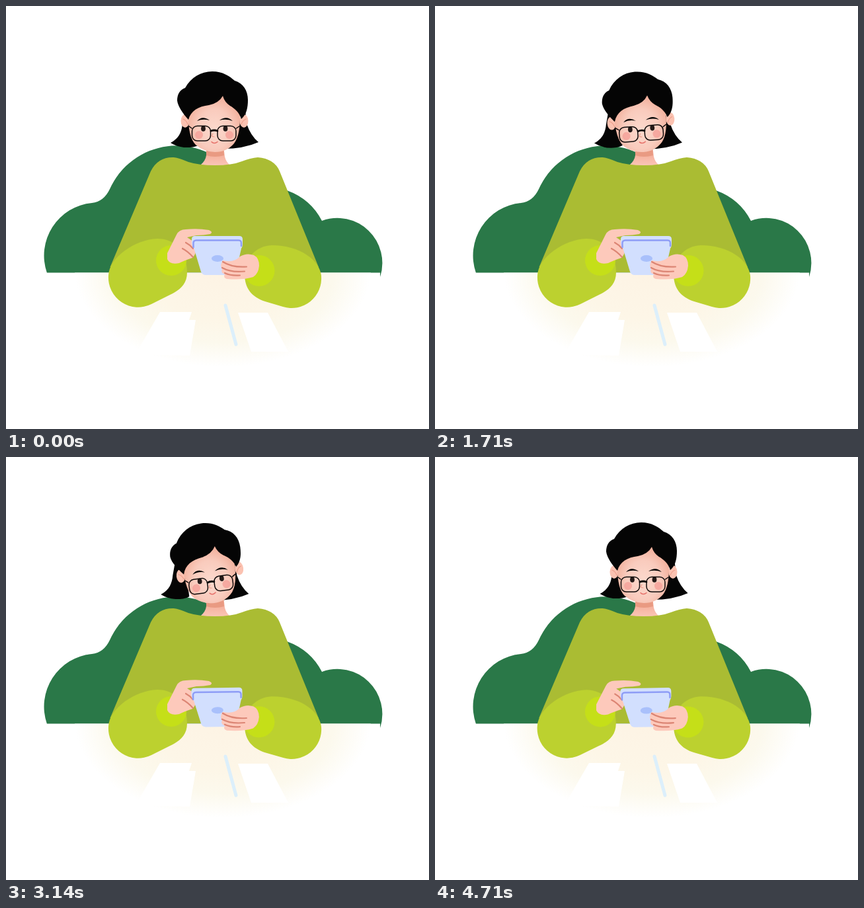
An HTML page for the animation above (4780 ms loop, 640x640 px).

```html
<!DOCTYPE html>
<html lang="en">
<head>
<meta charset="utf-8">
<title>Woman with phone</title>
<style>
html, body { margin: 0; width: 100%; height: 100%; overflow: hidden; background: #fff; }
svg { display: block; width: 100vw; height: 100vh; }
.line { fill: none; stroke-linecap: round; stroke-linejoin: round; }
.crease { stroke: #dc8574; stroke-width: 2.2; }
.ink { stroke: #0a0808; stroke-width: 1.5; }
.skin { fill: #fdc9bb; }
.olive { fill: #aabc33; }
.sleeve { fill: #bcd12f; }
.cuff { fill: #c5df18; }
.hair { fill: #050505; }
</style>
</head>
<body>
<svg viewBox="0 0 640 640">
  <defs>
    <radialGradient id="glow">
      <stop offset="0" stop-color="#fdf3e4"/>
      <stop offset=".5" stop-color="#fdf6e7"/>
      <stop offset=".75" stop-color="#fcf9ed"/>
      <stop offset="1" stop-color="#fff"/>
    </radialGradient>
    <radialGradient id="face" cx=".5" cy=".62" r=".6">
      <stop offset="0" stop-color="#fcd9cd"/>
      <stop offset=".55" stop-color="#f9cbbd"/>
      <stop offset="1" stop-color="#f0aa95"/>
    </radialGradient>
    <linearGradient id="neck" x2="0" y2="1">
      <stop offset=".3" stop-color="#f3ab96"/>
      <stop offset="1" stop-color="#fbc6b7"/>
    </linearGradient>
    <clipPath id="desk"><path d="M0 403.500H640V640H0Z"/></clipPath>
  </defs>

  <path fill="#2a7848" d="M62 404A80 80 0 0 1 130 298Q148 296 157 277A111 111 0 0 1 345 253L425 279Q461 292 478 325A68 68 0 0 1 566 410L565 404Z"/>

  <g clip-path="url(#desk)">
    <path fill="#fff" d="M60 403H566V560H60Z"/>
    <ellipse cx="328" cy="400" rx="224" ry="146" fill="url(#glow)"/>
  </g>
  <path fill="#fff" d="M233 463H281L277 475H287L278 529L196 527ZM351 464H396L427 523H371Z"/>
  <path class="line" stroke="#dceffb" stroke-width="5" d="M332 453L348 512"/>

  <g id="tails" class="hair">
    <path d="M272 150L267 178C266 190 262 200 249 207Q262 215 278 214Q288 213 292 210L284 150Z"/>
    <path d="M362 158L364 178Q370 196 382 206Q360 216 328 216L348 180Z"/>
  </g>
  <path fill="url(#neck)" d="M303 212H329L331 228Q333 236 339 241Q316 243 294 241Q302 234 303 226Z"/>
  <path fill="#e99a82" d="M303 216H329L330 226Q316 230 303 226Z"/>
  <path id="torso" class="olive"/>

  <g id="head">
    <ellipse cx="271" cy="174" rx="6.5" ry="10" fill="#fbc2b1"/>
    <ellipse cx="360" cy="174" rx="6.5" ry="10" fill="#fbc2b1"/>
    <path class="line" stroke="#ee9f8c" stroke-width="1.2" d="M268 171Q273 173 275 179M363 171Q358 173 356 179"/>
    <path fill="url(#face)" d="M276 162Q275 198 287 210Q300 221 316 221Q334 221 345 208Q355 195 354 162L342 130H290Z"/>
    <path class="hair" d="M276 172C268 163 260 152 259 143C259 133 264 126 271 124C280 108 295 99 312 99C328 99 338 106 346 113C359 117 366 128 366 142C366 154 364 164 356 171C353 161 346 155 339 151Q331 146 328 136Q322 147 307 150C291 152 280 158 276 172Z"/>
    <g fill="#f59d96" opacity=".75">
      <circle cx="292" cy="195" r="6"/><circle cx="338" cy="195" r="6"/>
    </g>
    <g fill="#241a18">
      <ellipse cx="298.5" cy="185.5" rx="3.4" ry="4.3"/><ellipse cx="332" cy="185.5" rx="3.4" ry="4.3"/>
    </g>
    <path id="brows" class="hair" d="M289 174Q297 165 308 173Q298 170 289 174ZM343 174Q334 165 323 173Q333 170 343 174Z"/>
    <g class="line ink">
      <rect x="281.5" y="181.500" width="28" height="22.500" rx="8"/>
      <rect x="320" y="181.500" width="28" height="22.500" rx="8"/>
      <path d="M281 185L277 182M348.500 185L353 182"/>
      <path stroke-width="2.8" d="M310 189Q315 187 320 189"/>
    </g>
    <path class="line" stroke="#f09d8c" stroke-width="1.2" d="M313 193L311 197L315 198"/>
    <path class="line" stroke="#e66f68" stroke-width="1.5" d="M311 205.500Q315 209.500 320 205.500"/>
  </g>

  <g id="leftArm">
    <path class="sleeve" d="M155 408C156 380 196 353 229 352C256 352 274 373 274 403C274 421 263 430 248 437L220 451A45 45 0 0 1 155 408Z"/>
    <circle class="cuff" cx="250" cy="385" r="23"/>
    <path class="skin" d="M244 374L258 346Q262 338 272 338Q290 336 307 339Q314 342 309 345Q299 347 288 347L274 350L286 358Q291 372 282 381Q270 385 262 389Q248 392 244 383Z"/>
    <path class="line crease" d="M272 358Q278 361 283 367M267 367Q275 371 283 380"/>
  </g>

  <g id="rightSleeve">
    <path class="sleeve" d="M477 408C475 385 445 362 402 362C378 363 361 382 361 405C361 428 372 440 392 447L419 455A45 45 0 0 0 477 408Z"/>
    <circle class="cuff" cx="383" cy="400.500" r="23.500"/>
  </g>
  <g id="phone">
    <path fill="#d2dffe" d="M281 353Q281 348 286 348H353Q358 348 358 353V361Q358 364 356 367L348 402Q346 407 341 407H302Q297 407 295 402L284.500 367Q281 363 281 359Z"/>
    <path class="line" stroke="#8e9df6" stroke-width="2.500" d="M283.500 365V360Q283 354.500 288 354.500H352Q356.500 354.500 356 360V363"/>
    <ellipse cx="320" cy="382" rx="9" ry="5" fill="#a9c0fb"/>
  </g>
  <g id="rightHand">
    <path class="skin" d="M328 385Q345 389 354 379Q364 373 375 377Q383 381 383 393Q382 405 374 410Q358 415 334 413Q328 411 331 406Q324 403 327 398Q323 392 328 385Z"/>
    <path class="line crease" d="M328 387Q342 396 364 394.500M327 396Q340 403.500 361 401.500M331 404Q340 408.500 354 407.500"/>
  </g>
</svg>
<script>
const LOOP = 4780, STEP = LOOP / 67;
const TAPS = [815, 2420, 4020];
const SHOULDER = [245, 255], ELBOW = [199, 412];
const el = id => document.getElementById(id);
const move = (id, value) => el(id).setAttribute('transform', value);
const clamp = v => Math.min(1, Math.max(0, v));
const part = (t, start, length) => clamp((t - start) / length);
const bump = (t, start, length) => Math.sin(Math.PI * part(t, start, length)) ** 2;
const ease = (t, start, length) => (1 - Math.cos(Math.PI * part(t, start, length))) / 2;
const sum = f => TAPS.reduce((total, start) => total + f(start), 0);

function turn([x, y], [cx, cy], degrees) {
  const a = degrees * Math.PI / 180, c = Math.cos(a), s = Math.sin(a);
  return [cx + (x - cx) * c - (y - cy) * s, cy + (x - cx) * s + (y - cy) * c];
}

function draw(t) {
  const tilt = ease(t, 1340, 680) - ease(t, 3200, 680);
  move('head', `rotate(${-7.6 * tilt} 315 227)`);
  move('brows', `translate(0 ${-4 * bump(t, 0, 430)})`);
  const sway = 3 * bump(t, 3560, 1350) - bump(t, 2450, 1000);
  move('tails', `translate(${-14 * tilt + sway} ${tilt})`);

  // The elbow swings out while the forearm turns down behind the phone.
  const tap = sum(start => bump(t, start, 720));
  const [ex, ey] = turn(ELBOW, SHOULDER, 5.5 * tap);
  const [px, py] = ELBOW;
  move('leftArm', `translate(${ex - px} ${ey - py}) rotate(${28 * tap} ${px} ${py})`);
  el('torso').setAttribute('d', `M${ex} ${ey}L${ex - 41.5} ${ey - 17}L219 250Q230 228 254 229Q262 230 276 236Q292 241 316 241Q342 241 357 235Q370 230 381 229Q406 231 414 250L473 395L430 403H215Z`);

  // The phone gives way to the touch, then dips before it settles.
  const push = sum(start => Math.sin(2 * Math.PI * part(t, start, 800)));
  const press = Math.max(push, 0), dip = Math.max(-push, 0);
  move('phone', `translate(${press - dip * .6} ${dip * 2}) rotate(${1.3 * push} 320 366) translate(0 366) scale(1 ${1 - .05 * press}) translate(0 -366)`);
  const nudge = `rotate(${.7 * push} 432 412)`;
  move('rightSleeve', nudge);
  move('rightHand', nudge);
}

function frame() {
  const t = (performance.now() + 3) % LOOP;
  draw(Math.floor(t / STEP) * STEP);
  requestAnimationFrame(frame);
}
frame();
</script>
</body>
</html>
```
